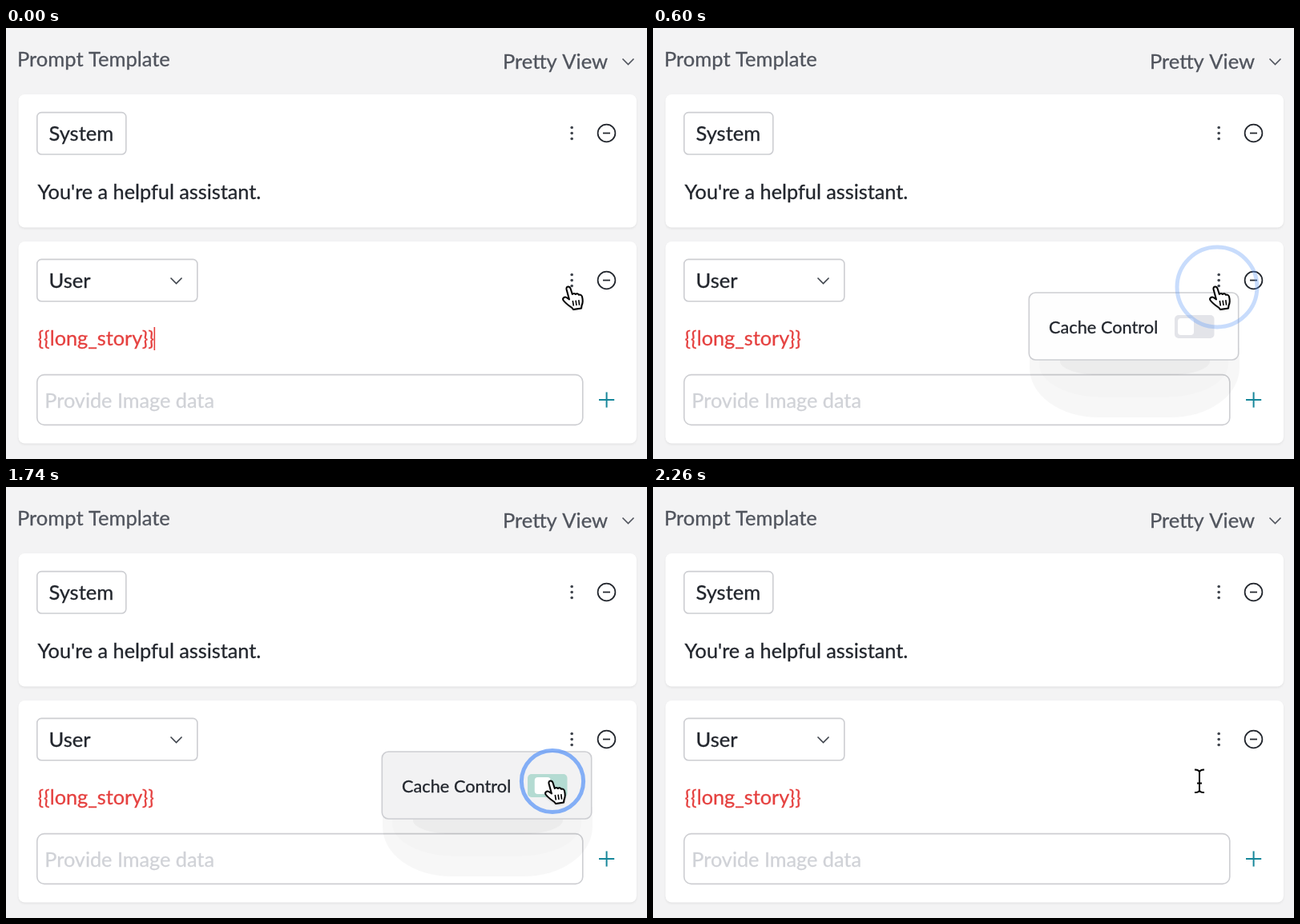
Write an HTML page with a canvas that moves like this. It is 800 px wide and 539 px high and loops after 2360 ms.

```html
<!DOCTYPE html>
<html lang="en">
<head>
<meta charset="utf-8">
<title>Prompt template</title>
<style>
  html, body { margin: 0; width: 100%; height: 100%; overflow: hidden; background: #f3f3f4; }
  canvas { display: block; width: 800px; height: 539px; }
</style>
</head>
<body>
<canvas id="stage" width="800" height="539"></canvas>
<script>
const ctx = document.getElementById('stage').getContext('2d');
const LOOP = 2360;
const INK = '#22262d', BORDER = '#cdced2', GREY = '#50545d';

const clamp = v => Math.min(1, Math.max(0, v));
const ramp = (t, from, to) => clamp((t - from) / (to - from));
const easeOut = (u, power) => 1 - (1 - u) ** power;
const lerp = (a, b, u) => a + (b - a) * u;
const mix = (a, b, u) => `rgb(${a.map((v, i) => Math.round(lerp(v, b[i], u)))})`;

// A hairline outline gives the slightly heavier strokes of the interface text
function text(str, x, y, color, size = 25.5) {
  ctx.font = `${size}px Lato, sans-serif`;
  ctx.fillStyle = ctx.strokeStyle = color;
  ctx.lineWidth = 0.3;
  ctx.fillText(str, x, y);
  ctx.strokeText(str, x, y);
}

function box(x, y, w, h, r, fill, stroke) {
  ctx.beginPath();
  ctx.roundRect(x, y, w, h, r);
  if (fill) { ctx.fillStyle = fill; ctx.fill(); }
  if (stroke) { ctx.strokeStyle = stroke; ctx.lineWidth = 1.6; ctx.stroke(); }
}

function line(points, color, width) {
  ctx.beginPath();
  points.forEach(([x, y]) => ctx.lineTo(x, y));
  ctx.strokeStyle = color;
  ctx.lineWidth = width;
  ctx.stroke();
}

function circle(x, y, r) {
  ctx.beginPath();
  ctx.arc(x, y, r, 0, Math.PI * 2);
}

function chevron(x, y, color) {
  line([[x - 7, y - 3.5], [x, y + 3.5], [x + 7, y - 3.5]], color, 1.6);
}

function card(y, h) {
  ctx.save();
  ctx.shadowColor = 'rgba(0,0,0,.07)';
  ctx.shadowBlur = 3;
  ctx.shadowOffsetY = 1.5;
  box(15.5, y, 771.5, h, 8, '#fff');
  ctx.restore();
}

function messageActions(y) {
  ctx.fillStyle = '#3f444c';
  for (const dy of [-7, 0, 7]) {
    circle(706.2, y + dy, 1.8);
    ctx.fill();
  }
  circle(749.5, y, 10.9);
  ctx.strokeStyle = INK;
  ctx.lineWidth = 1.75;
  ctx.stroke();
  line([[745, y], [754, y]], INK, 1.75);
}

function drawPage(t) {
  ctx.fillStyle = '#f3f3f4';
  ctx.fillRect(0, 0, 800, 539);
  text('Prompt Template', 14, 47.5, GREY);
  text('Pretty View', 620, 51, GREY);
  chevron(776.5, 42, GREY);

  card(83, 166.5);
  box(38.8, 105.6, 111, 52.4, 5.5, '#fff', BORDER);
  text('System', 53.5, 141, INK);
  messageActions(131.5);
  text("You're a helpful assistant.", 39.6, 213.5, INK, 25.25);

  card(267, 252.5);
  box(38.8, 289.4, 200, 52.4, 5.5, '#fff', BORDER);
  text('User', 53.5, 325, INK);
  chevron(212.5, 316, '#3f444c');
  messageActions(315.5);
  text('{{long_story}}', 39.5, 397, '#e5403f', 25.25);
  if (t < 260) line([[185.3, 374], [185.3, 403]], '#e5403f', 1.6);

  box(38.8, 433.6, 681, 62.8, 9, '#fff', BORDER);
  text('Provide Image data', 48.3, 475, '#d0d2d7', 25.25);
  line([[740, 465], [759.2, 465]], '#16879a', 2);
  line([[749.6, 455.4], [749.6, 474.6]], '#16879a', 2);
}

function drawToggle(t) {
  const on = ramp(t, 1710, 1850);
  box(651, 359, 49.5, 29, 5, mix([227, 228, 233], [16, 186, 129], on));
  const tick = ramp(on, 0.3, 1);
  if (tick) line([[657.5, 373.5], [662, 378], [671, 369]], `rgba(255,255,255,${tick})`, 2);
  box(lerp(655, 676.5, on), 363, 20, 21, 4, '#fff');
}

function drawPopup(t) {
  const shown = easeOut(ramp(t, 310, 510), 3) * (1 - ramp(t, 2160, 2255));
  if (!shown) return;
  const scale = lerp(0.8, 1, shown);
  ctx.save();
  ctx.globalAlpha = shown;
  ctx.translate(0, 330);
  ctx.scale(1, scale);
  ctx.translate(0, -330);

  // Shadow in three soft steps below the panel
  for (const [x, w, bottom, rx, alpha] of [
    [470, 262, 487, 85, 0.03], [482, 236, 462, 80, 0.012], [508, 187, 434, 50, 0.03]
  ]) {
    const corner = { x: rx, y: (bottom - 414) * 0.85 };
    box(x, 400, w, bottom - 400, [0, 0, corner, corner], `rgba(0,0,0,${alpha})`);
  }
  const hover = ramp(t, 870, 1100);
  box(469.3, 331, 261.4, 84, 8, mix([254, 254, 254], [242, 242, 243], hover), BORDER);
  text('Cache Control', 494, 381.5, INK, 21.75);
  drawToggle(t);
  ctx.restore();
}

function drawClick(t, start, x, y) {
  const age = t - start;
  if (age < 0 || age > 500) return;
  const radius = 50.5 * (1 - Math.exp(-(age + 2) / 85));
  const alpha = 0.76 * (1 - ramp(age, 250, 490));
  circle(x, y, radius);
  ctx.strokeStyle = `rgba(96,153,247,${alpha})`;
  ctx.lineWidth = Math.min(5, radius);
  ctx.stroke();
}

const hand = new Path2D(
  'M5.6 5C4.6 .8 9.3 .2 10.5 3.8L12.8 11C13.8 9.5 16 9.5 16.8 11C18 9.8 20.3 10 21 11.8' +
  'C22.5 11 24.5 12 25 14C26 18 26.5 21 24.5 25L24 28.5L14 30L12.5 28' +
  'C9 25.5 5 23 1.6 18.5C0 16 3 13.5 5.5 15L9 17.5Z');
const knuckles = new Path2D('M13.3 19L14.4 25.5M17.1 18.6L18 25M20.8 18.2L21.6 24.6');
const beam = new Path2D(
  'M-6 -14.5C-2 -14.5 0 -13 0 -11C0 -13 2 -14.5 6 -14.5' +
  'M0 -11V11M-3 2.5H3M-6 14C-2 14 0 13 0 11C0 13 2 14 6 14');

function drawCursor(t) {
  ctx.save();
  ctx.lineJoin = 'round';
  ctx.strokeStyle = '#000';
  if (t < 2220) {
    const u = ramp(t, 765, 1310);
    ctx.translate(lerp(694, 672, easeOut(u, 2.1)), lerp(322, 366, easeOut(u, 3.3)));
    ctx.save();
    ctx.shadowColor = 'rgba(0,0,0,.3)';
    ctx.shadowBlur = 3;
    ctx.shadowOffsetY = 1;
    ctx.fillStyle = '#fff';
    ctx.fill(hand);
    ctx.restore();
    ctx.lineWidth = 2;
    ctx.stroke(hand);
    ctx.lineWidth = 1.6;
    ctx.stroke(knuckles);
  } else {
    ctx.translate(682, 368);
    ctx.strokeStyle = '#fff';
    ctx.lineWidth = 4;
    ctx.stroke(beam);
    ctx.strokeStyle = '#000';
    ctx.lineWidth = 2;
    ctx.stroke(beam);
  }
  ctx.restore();
}

function frame() {
  const t = performance.now() % LOOP;
  drawPage(t);
  drawPopup(t);
  drawClick(t, 220, 704, 324);
  drawClick(t, 1620, 682, 368);
  drawCursor(t);
  requestAnimationFrame(frame);
}
frame();
</script>
</body>
</html>
```
